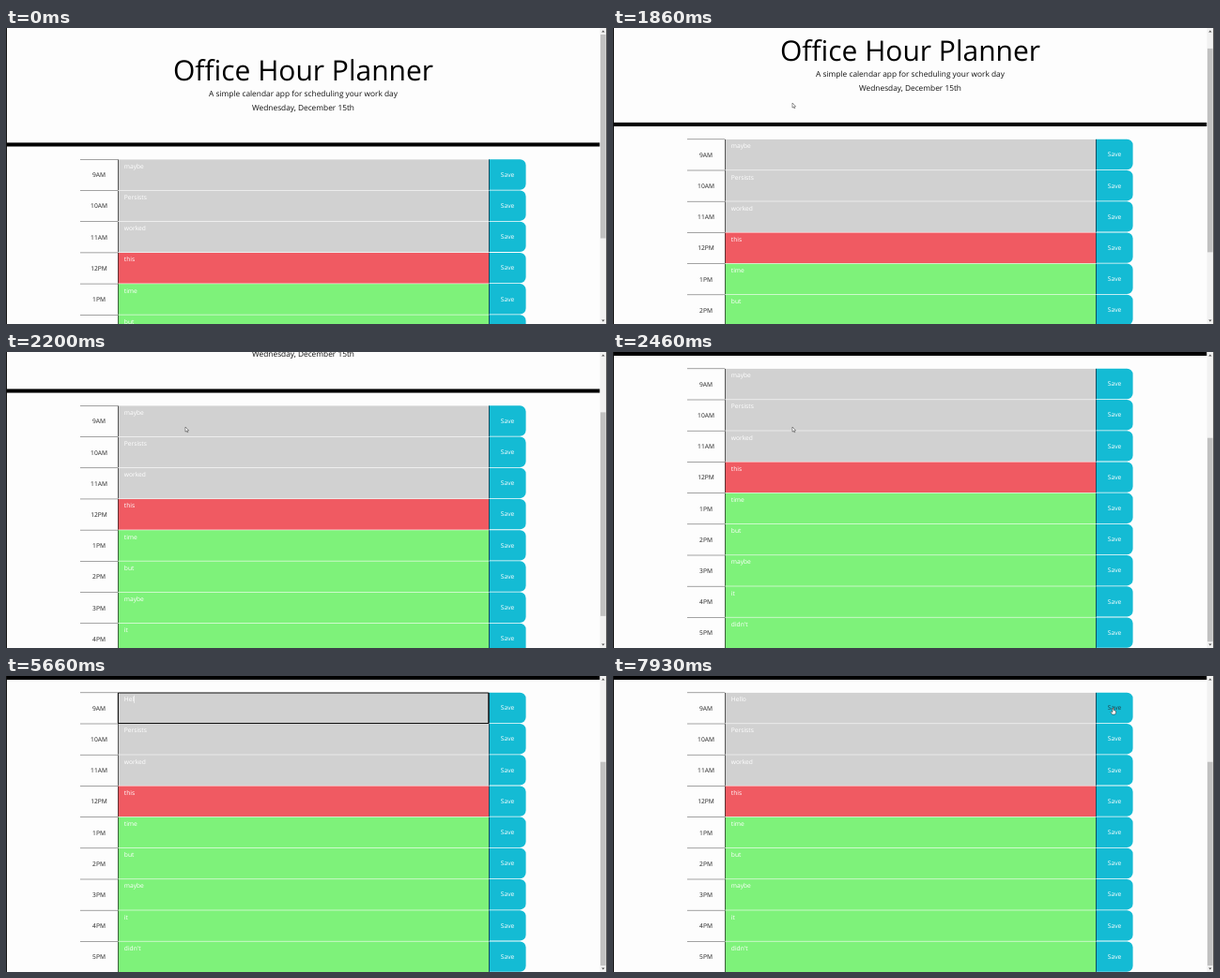
These frames come from a looping animation (640 px wide and 316 px high, 8000 ms). An HTML page:

```html
<!DOCTYPE html>
<html lang="en">
<head>
<meta charset="utf-8">
<title>Office Hour Planner</title>
<style>
  html, body { margin: 0; width: 100%; height: 100%; overflow: hidden; background: #fdfdfd; }
  svg { display: block; width: 100vw; height: 100vh; }
  text { font-family: "Open Sans", sans-serif; font-size: 6.67px; text-rendering: geometricPrecision; }
  .mid { text-anchor: middle; }
</style>
</head>
<body>
<svg id="stage" viewBox="0 0 640 316" preserveAspectRatio="none"></svg>
<script>
const LOOP = 8000;
const ROW_TOP = 140, ROW_H = 33.2, MAX_SCROLL = 122.5;
const LEFT = 79, AREA = 119, SAVE = 514, RIGHT = 553.6;
const COLORS = { past: '#d1d1d1', present: '#f05a62', future: '#7ef27a', save: '#14bbd4' };
const ROWS = [
  ['9AM', 'maybe', 'past'], ['10AM', 'Persists', 'past'], ['11AM', 'worked', 'past'],
  ['12PM', 'this', 'present'], ['1PM', 'time', 'future'], ['2PM', 'but', 'future'],
  ['3PM', 'maybe', 'future'], ['4PM', 'it', 'future'], ['5PM', "didn't", 'future']
];

// Tables of [time, value...]
const SCROLL = [[1790, 0], [1860, 21.3], [1930, 35], [2000, 41.5], [2060, 50], [2130, 66],
  [2200, 82.7], [2260, 98], [2330, 112], [2400, 119], [2460, MAX_SCROLL]];
const POINTER = [[330, 400, 300], [800, 250, 140], [1130, 195, 74], [1330, 191, 80], [2730, 191, 80],
  [3050, 168, 50], [3400, 148, 25], [3600, 147, 25], [3800, 144.5, 25], [4200, 125, 25],
  [4400, 106, 25], [6330, 106, 25], [6530, 104, 24], [6800, 104, 24], [7100, 240, 30],
  [7400, 445, 38], [7660, 532.5, 34]];
const TYPED = [[0, 'maybe'], [5200, 'H'], [5400, 'He'], [5660, 'Hel'], [5800, 'Hell'], [5860, 'Hello']];
const SELECTED_FROM = [[0, 5], [3730, 4], [3870, 3], [3930, 2], [4060, 1], [4200, 0], [5200, 5]];
const FOCUS = [3530, 7800];

const svg = document.getElementById('stage');

function add(parent, tag, attrs, content) {
  const node = document.createElementNS('http://www.w3.org/2000/svg', tag);
  for (const key in attrs) node.setAttribute(key, attrs[key]);
  if (content) node.textContent = content;
  return parent.appendChild(node);
}
const rect = (parent, x, y, width, height, fill) => add(parent, 'rect', { x, y, width, height, fill });
const label = (parent, x, y, content, fill, mid) =>
  add(parent, 'text', { x, y, fill, class: mid ? 'mid' : '' }, content);
const show = (node, on) => node.setAttribute('visibility', on ? 'visible' : 'hidden');

function lerp(table, t, column = 1) {
  if (t <= table[0][0]) return table[0][column];
  for (let i = 1; i < table.length; i++) {
    const a = table[i - 1], b = table[i];
    if (t < b[0]) return a[column] + (b[column] - a[column]) * (t - a[0]) / (b[0] - a[0]);
  }
  return table[table.length - 1][column];
}
const step = (table, t) => table.filter(entry => entry[0] <= t).pop()[1];

// Page
rect(svg, 0, 0, 640, 316, '#fdfdfd');
const page = add(svg, 'g', {});
label(page, 316.5, 56, 'Office Hour Planner', '#000', true).style.fontSize = '30px';
label(page, 316.5, 73, 'A simple calendar app for scheduling your work day', '#111', true).style.fontSize = '8.33px';
label(page, 316.5, 88, 'Wednesday, December 15th', '#111', true).style.fontSize = '8.33px';
rect(page, 0, 122.4, 632.5, 4.1, '#000');

const rows = ROWS.map(([hour, note, kind], i) => {
  const g = add(page, 'g', { transform: `translate(0 ${ROW_TOP + i * ROW_H})` });
  rect(g, LEFT, 0, AREA - LEFT, 0.6, '#666');
  label(g, 99, 19.3, hour, '#222', true);
  rect(g, AREA, 0.4, SAVE - AREA, ROW_H - 0.6, COLORS[kind]);
  rect(g, AREA, 0.4, 0.7, ROW_H - 0.6, '#222');
  const h = ROW_H - 0.5, r = 6.2;
  add(g, 'path', {
    d: `M${SAVE} .3H${RIGHT - r}a${r} ${r} 0 0 1 ${r} ${r}V${h - r}a${r} ${r} 0 0 1 ${-r} ${r}H${SAVE}z`,
    fill: COLORS.save
  });
  rect(g, SAVE, 0.4, 0.7, ROW_H - 0.6, '#123');
  const save = label(g, 534, 18.8, 'Save', '#fff', true);
  const mark = rect(g, 0, 3, 0, 8.8, '#1a78e0');
  const text = label(g, 125.8, 9.8, note, '#fff');
  return { g, save, mark, text };
});

const first = rows[0];
const caret = rect(first.g, 0, 3.2, 0.6, 8.2, '#fff');
const outline = add(first.g, 'rect', {
  x: AREA + 0.4, y: 0.5, width: SAVE - AREA - 0.6, height: ROW_H - 0.6,
  fill: 'none', stroke: '#111', 'stroke-width': 1.1, rx: 0.5
});

// Scrollbar and window edges
rect(svg, 632.5, 0, 7, 316, '#f1f1f1');
const thumb = rect(svg, 633, 7, 5.6, 217.5, '#c1c1c1');
add(svg, 'path', { d: 'M634.2 4.6h3.4l-1.7-2zM634.2 311.6h3.4l-1.7 2z', fill: '#555' });
rect(svg, 0, 0, 1, 316, '#111');
rect(svg, 639.3, 0, 0.7, 316, '#222');

// Pointer shapes, hot spot at the origin
const pointer = add(svg, 'g', {});
const shapes = {
  arrow: add(pointer, 'path', {
    d: 'M0 0V5.2L1.2 4.1 2 5.9 2.8 5.5 2 3.8H3.6z', fill: '#fff', stroke: '#333', 'stroke-width': 0.5
  }),
  beam: add(pointer, 'path', {
    d: 'M-1.2-3.2H1.2M0-3.2V3.2M-1.2 3.2H1.2', fill: 'none', stroke: '#444', 'stroke-width': 0.6
  }),
  hand: add(pointer, 'path', {
    d: 'M-.6 0h1.2v2.6l2.4.6v2.2L2.2 7H-1L-2.4 4.4l.6-.6 1.2.9z',
    fill: '#fff', stroke: '#222', 'stroke-width': 0.5
  })
};

function pointerShape(t, x) {
  if (t < 620) return 'beam';
  if (t < 2900) return 'arrow';
  if (x >= SAVE) return 'hand';
  return t > 6330 && x < AREA ? 'arrow' : 'beam';
}

function draw(t) {
  const scroll = lerp(SCROLL, t);
  page.setAttribute('transform', `translate(0 ${-scroll})`);
  thumb.setAttribute('y', 7 + scroll / MAX_SCROLL * 84.7);

  const note = step(TYPED, t);
  if (first.text.textContent !== note) first.text.textContent = note;
  const noteEnd = 125.8 + first.text.getComputedTextLength();

  const from = step(SELECTED_FROM, t);
  show(first.mark, from < 5);
  if (from < 5) {
    const x = first.text.getStartPositionOfChar(from).x;
    first.mark.setAttribute('x', x);
    first.mark.setAttribute('width', noteEnd - x);
  }

  const focused = t >= FOCUS[0] && t < FOCUS[1];
  show(outline, focused);
  const blinkOn = t < 6330 || Math.floor((t - 5860) / 530) % 2 === 0;
  show(caret, focused && t >= 5200 && blinkOn);
  caret.setAttribute('x', noteEnd + 0.2);

  const x = lerp(POINTER, t, 1), y = lerp(POINTER, t, 2);
  const visible = t >= 330 && !(t >= 5200 && t < 6330);
  const current = pointerShape(t, x);
  pointer.setAttribute('transform', `translate(${x} ${y})`);
  for (const name in shapes) show(shapes[name], visible && name === current);
  first.save.setAttribute('fill', visible && current === 'hand' ? '#21404a' : '#fff');
}

const start = performance.now();
function tick() {
  draw((performance.now() - start) % LOOP);
  requestAnimationFrame(tick);
}
tick();
</script>
</body>
</html>
```
